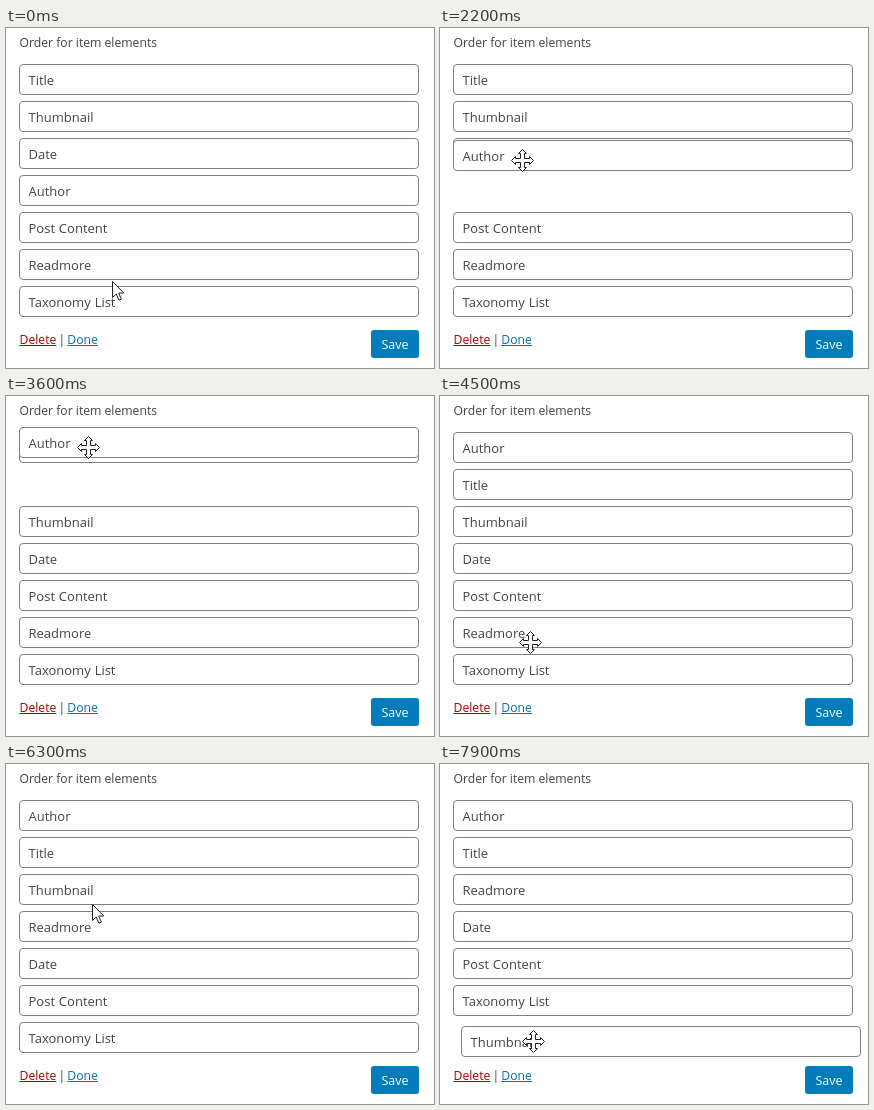
Write an HTML page that moves like this. It is 428 px wide and 340 px high and loops after 8000 ms.

```html
<!DOCTYPE html>
<html lang="en">
<head>
<meta charset="utf-8">
<title>Sortable list</title>
<style>
  html, body { margin: 0; width: 100%; height: 100%; overflow: hidden; background: #fefefe; }
  #stage {
    position: relative; width: 428px; height: 340px; overflow: hidden;
    font: 12.2px/20px "Open Sans", "Noto Sans", sans-serif; color: #444; cursor: default;
  }
  #stage > * { position: absolute; white-space: pre; }
  .row {
    left: 13px; top: 36px; width: 400px; height: 31px; box-sizing: border-box;
    padding-left: 8.5px; border: 1px solid #7e8084; border-radius: 4px;
    background: #fff; font-size: 13px; line-height: 30px; word-spacing: .5px;
  }
  .head { left: 13.5px; top: 5px; }
  .foot { left: 13.5px; top: 302px; word-spacing: -1px; }
  .foot span { text-decoration: underline; }
  .delete { color: #a00; }
  .done { color: #0073aa; }
  .save {
    left: 365px; top: 302px; width: 48px; height: 28px; line-height: 30px;
    border-radius: 3px; background: #007cba; color: #fff; text-align: center; font-size: 12.5px;
  }
  svg { left: 0; top: 0; width: 428px; height: 340px; z-index: 3; }
  path { fill: #fff; stroke: #222; }
</style>
</head>
<body>
<div id="stage">
  <div class="head">Order for item elements</div>
  <div class="foot"><span class="delete">Delete</span> | <span class="done">Done</span></div>
  <div class="save">Save</div>
  <svg>
    <path id="arrow" d="M-.5-.5v16l3.7-3.5 2.7 6.2 2.5-1.1-2.7-6.1h5.1z"/>
    <path id="move" d="M.5-11.5l4 4h-2v5h5v-2l4 4-4 4v-2h-5v5h2l-4 4-4-4h2v-5h-5v2l-4-4 4-4v2h5v-5h-2z"/>
  </svg>
</div>
<script>
const LOOP = 8000, STEP = 100;
const TOP = 36, PITCH = 37, HEIGHT = 31, MIDDLE = 16;
const names = ['Title', 'Thumbnail', 'Date', 'Author', 'Post Content', 'Readmore', 'Taxonomy List'];

// Key points of the pointer: time, x, y
const path = [
  [0, 107, 254], [1100, 82, 168], [1300, 82, 168], [2200, 82, 132.5], [3600, 82, 52],
  [4000, 82, 34], [4500, 90, 247], [4800, 90, 239], [5000, 90, 239], [5600, 88, 158],
  [6000, 87, 146], [7200, 85, 126], [7700, 93, 271], [LOOP, 93, 282]
];
// Button pressed and released
const drags = [[1300, 4000], [5000, 6000], [7200, Infinity]];

const stage = document.getElementById('stage');
const arrow = document.getElementById('arrow');
const move = document.getElementById('move');
const rows = names.map(name => {
  const el = document.createElement('div');
  el.className = 'row';
  el.textContent = name;
  return stage.appendChild(el);
});

function pointerAt(t) {
  const i = Math.max(1, path.findIndex(p => p[0] >= t));
  const [t0, x0, y0] = path[i - 1], [t1, x1, y1] = path[i];
  const k = (t - t0) / (t1 - t0);
  return { x: x0 + (x1 - x0) * k, y: y0 + (y1 - y0) * k };
}

// Neighbours swap once the pointer passes their middle
function slotFor(y, from, startY) {
  const pos = (y - TOP - MIDDLE) / PITCH;
  return y < startY
    ? Math.max(0, Math.min(from, Math.floor(pos) + 1))
    : Math.min(names.length - 1, Math.max(from, Math.ceil(pos) - 1));
}

function place(el, x, y, z) {
  el.style.transform = `translate(${Math.round(x)}px, ${Math.round(y)}px)`;
  el.style.zIndex = z;
}

function render(t) {
  const pointer = pointerAt(t);
  const order = names.map((_, i) => i);
  let held = null;

  for (const [start, end] of drags) {
    if (t < start) break;
    const grab = pointerAt(start);
    const at = pointerAt(Math.min(t, end));
    const slot = Math.floor((grab.y - TOP) / PITCH);
    const [item] = order.splice(slot, 1);
    order.splice(slotFor(at.y, slot, grab.y), 0, item);
    if (t < end) held = { item, x: at.x - grab.x, y: slot * PITCH + at.y - grab.y };
  }

  order.forEach((item, slot) => place(rows[item], 0, slot * PITCH, 1));
  if (held) place(rows[held.item], held.x, held.y, 2);

  const onRow = (pointer.y - TOP) % PITCH < HEIGHT;
  const [shown, hidden] = held || onRow ? [move, arrow] : [arrow, move];
  shown.setAttribute('transform', `translate(${Math.round(pointer.x)} ${Math.round(pointer.y)})`);
  shown.style.display = '';
  hidden.style.display = 'none';
}

const began = performance.now();
function tick() {
  const t = (performance.now() - began + 20) % LOOP;
  render(Math.floor(t / STEP) * STEP);
  requestAnimationFrame(tick);
}
tick();
</script>
</body>
</html>
```
